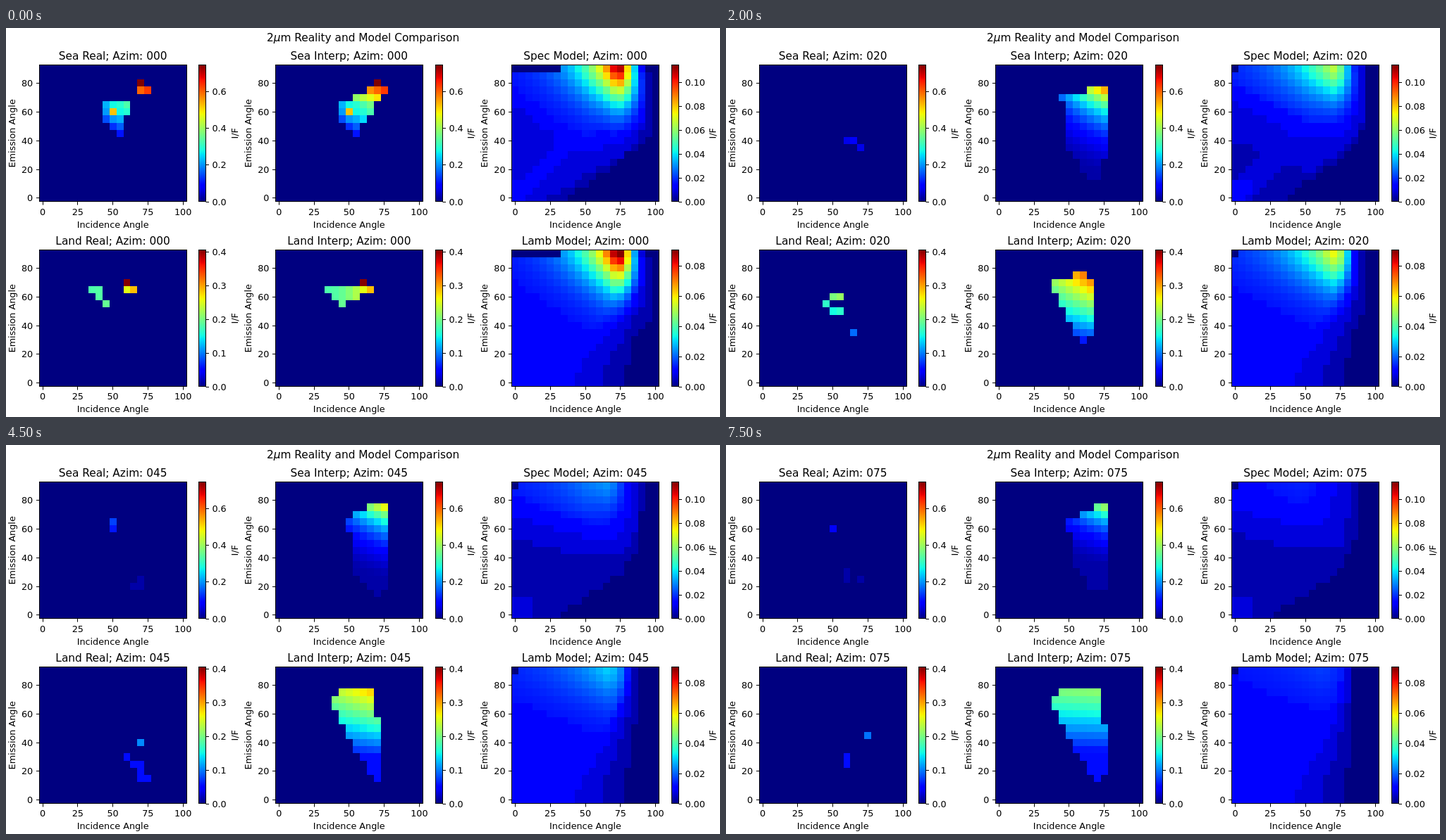
These frames come from a looping animation (1013x553 px, 8 s). An HTML page with a canvas:

```html
<!DOCTYPE html>
<html lang="en">
<head>
<meta charset="utf-8">
<title>Reality and Model Comparison</title>
<style>
  html, body { margin: 0; width: 100%; height: 100%; overflow: hidden; background: #fff; }
  canvas { display: block; }
</style>
</head>
<body>
<canvas id="stage" width="1013" height="553"></canvas>
<script>
const ctx = document.getElementById('stage').getContext('2d');
const STEP_MS = 500, STEPS = 16;
const COLS = 21, ROWS = 19, WIDTH = 209, HEIGHT = 194.4;
const CELL_W = WIDTH / COLS, CELL_H = HEIGHT / ROWS;
const FONT = '"DejaVu Sans", sans-serif', SMALL = 12.79, LARGE = 15.35;

const clamp = (v, lo = 0, hi = 1) => Math.min(hi, Math.max(lo, v));
const bell = x => Math.exp(-x * x);

// Piecewise linear curve through [x, y] points.
function ramp(v, points) {
  const i = points.findIndex(p => v <= p[0]);
  if (i < 0) return points[points.length - 1][1];
  if (i === 0) return points[0][1];
  const [x0, y0] = points[i - 1], [x1, y1] = points[i];
  return y0 + (y1 - y0) * (v - x0) / (x1 - x0);
}

function jet(v) {
  const r = ramp(v, [[.35, 0], [.66, 1], [.89, 1], [1, .5]]);
  const g = ramp(v, [[.125, 0], [.375, 1], [.64, 1], [.91, 0]]);
  const b = ramp(v, [[0, .5], [.11, 1], [.34, 1], [.65, 0]]);
  return `rgb(${[r, g, b].map(x => Math.round(x * 255))})`;
}

// Interpolated surfaces: a row range, left and right edges per row, and a value per cell.
function seaSurface(az) {
  if (az === 0) {
    const left = r => ramp(r, [[9, 11], [11, 9], [13, 9], [15, 13], [16, 14]]);
    const right = r => ramp(r, [[9, 10.7], [12, 12.6], [15, 15], [16, 14]]);
    const value = (c, r) => ramp(r, [[9, .1], [13, .3], [16, .745]])
      + .035 * (c - (left(r) + right(r)) / 2) + .3 * bell(Math.hypot(c - 10, r - 12) / .6);
    return { bottom: 9, top: 16, left, right, value };
  }
  return {
    bottom: Math.round(2 + az * .026),
    top: 15,
    left: r => ramp(r, [[2.5, 13.2 + az * .015], [7, 10 + az * .015], [11, 10 + az * .015],
      [12, 9.4 + az * .011], [13, 9.4 + az * .011], [14, 8.3 + az * .055], [15, 12.1 + az * .03]]),
    right: r => Math.min(15, 13 + (r - 3) * .35 + az * .03),
    value: (c, r) => {
      const edge = (.61 - az * .0027) * Math.exp(-(15 - r) * (.2 + az * .001)) - .02;
      return Math.max(.025, edge * (1 - .1 * (15 - c)));
    }
  };
}

function landSurface(az) {
  if (az === 0) return {
    bottom: 11,
    top: 14,
    left: r => ramp(r, [[11, 9], [13, 7], [14, 12]]),
    right: r => ramp(r, [[11, 9], [13, 13], [14, 12]]),
    value: (c, r) => .18 + .003 * (c - 7) ** 2 + .15 * Math.max(0, r - 13)
  };
  const bottom = Math.round(Math.max(3.4, 9.6 - az * .18));
  const left = r => ramp(r, [[3, 14], [7, 11], [11, 9], [13, 8], [14, 8.3], [15, Math.max(9, 12.8 - az * .1)]]);
  return {
    bottom,
    top: 15,
    left,
    right: r => {
      const side = 13.5 + .09 * (az * .36 - 5 - r);
      return Math.min(Math.max(r < 15 ? 13 : 12, side), left(r) + (r - bottom) * 1.5);
    },
    value: (c, r) => {
      const edge = (.38 - az * .0023) * (1 - .09 * (15 - r));
      return Math.max(.055, edge * (1 - (.075 - az * .0009) * (13 - c)));
    }
  };
}

function surfaceCells(s) {
  const cells = [];
  for (let r = s.bottom; r <= s.top; r++)
    for (let c = Math.round(s.left(r)); c <= Math.round(s.right(r)); c++) cells.push([c, r]);
  return cells;
}

// Observed cells lie on tracks through a few column, row points.
function track(...points) {
  const cells = [];
  for (let i = 0; i < points.length; i += 2) {
    const [c0, r0, c1 = c0, r1 = r0] = points.slice(i, i + 4);
    const n = Math.max(Math.abs(c1 - c0), Math.abs(r1 - r0), 1);
    for (let k = 0; k < n; k++)
      cells.push([Math.round(c0 + (c1 - c0) * k / n), Math.round(r0 + (r1 - r0) * k / n)]);
  }
  return cells;
}

function seaObserved(az) {
  if (az === 0) return [track(9, 13, 12, 13, 12, 12, 9, 12, 9, 11, 11, 11, 11, 9), track(10, 10),
    track(14, 16, 14, 15, 15, 15)].flat();
  if (az < 20) return [track(9, 13, 10, 13), track(12, 14, 13, 14, 13, 13, 14, 13),
    track(10, 11, 12, 11, 12, 8, 10, 8, 10, 9), track(10, 7, 11, 7), track(13, 3, 13, 2)].flat();
  if (az < 35) return track(12, 8, 13, 8, 14, 7);
  const high = az < 65 ? track(10, 13, 10, 12) : track(10, 12);
  const low = az < 55 ? track(14, 5, 14, 4, 13, 4) : track(14, 5);
  const stray = az < 45 ? track(12, 9, 13, 8) : az < 65 ? [] : track(12, 6, 12, 5);
  return [high, low, stray].flat();
}

function landObserved(az) {
  if (az === 0) return [track(7, 13, 8, 13, 8, 12, 9, 11), track(12, 14, 12, 13, 13, 13)].flat();
  if (az < 20) return [track(8, 13, 8, 12, 9, 12, 9, 11, 10, 11, 10, 10), track(10, 8),
    track(12, 14, 13, 14, 13, 13, 12, 13)].flat();
  if (az < 35) return [track(11, 12, 10, 12, 9, 11, 10, 10, 11, 10), track(13, 7)].flat();
  if (az < 45) return [track(8, 14), track(10, 12, 11, 12), track(12, 9, 14, 7), track(14, 4, 14, 3)].flat();
  if (az < 55) return [track(14, 8), track(12, 6, 13, 5, 14, 5, 14, 3, 15, 3)].flat();
  return az < 65 ? track(14, 5) : [track(15, 9), track(12, 6, 12, 5)].flat();
}

// Models return values normalised to their colour scale.
const emptyCorner = (c, r, az) => r === 18 && c < (az === 0 ? 7 : az <= 10 ? 2 : 1);
const banded = v => v < .14 ? Math.round(v / .04) * .04 : v;

function glint(inc, em, az, decay, spread) {
  const centre = 72 - az * .16, depth = 90 - em;
  const across = inc < centre
    ? Math.exp(-(centre - inc) / (21 + az * .35))
    : bell((inc - centre - 1) / (11 + az * .06 + depth * .2));
  return .9 * Math.exp(-((az / decay) ** 1.2)) * across * Math.exp(-((depth / spread) ** 1.4));
}

function specular(c, r, az) {
  if (emptyCorner(c, r, az)) return 0;
  const inc = c * 5, em = r * 5, near = Math.exp(-az / 25);
  const edge = 95 - az * .1 - 57.5 * Math.exp(-((em / 25) ** 1.5));
  let base = 0;
  if (inc < edge) {
    const height = em + (.2 + .55 * near) * Math.min(inc, 40);
    const floor = .04 + (em > .6 * (inc - 25) ? .04 * near : 0);
    const lift = clamp(.1 + (height - 77 + 9 * near) * .0021, floor, .12);
    const band = .03 * near * bell((inc - em) / 8) + (inc <= 10 && em <= 10 ? .04 : 0);
    base = Math.min(lift + band, .12, .04 + .002 * (edge - inc));
  }
  return banded(base + glint(inc, em, az, 30, 23));
}

function lambert(c, r, az) {
  if (emptyCorner(c, r, az)) return 0;
  const inc = c * 5, em = r * 5;
  const base = (.15 * Math.cos(inc * Math.PI / 180) - .0105) * (1 + (em / 45) ** 2);
  return banded(clamp(base, 0, .125) + glint(inc, em, az, 32, 23));
}

function text(str, x, y, { size = SMALL, align = 'center', turn = false } = {}) {
  ctx.save();
  ctx.translate(x, y);
  if (turn) ctx.rotate(-Math.PI / 2);
  ctx.font = `${size}px ${FONT}`;
  ctx.textAlign = align;
  ctx.fillStyle = '#000';
  ctx.fillText(str, 0, 0);
  ctx.restore();
}

function line(x0, y0, x1, y1) {
  ctx.beginPath();
  ctx.moveTo(x0, y0);
  ctx.lineTo(x1, y1);
  ctx.stroke();
}

function heading() {
  const parts = [['2', ''], ['μ', 'italic '], ['m Reality and Model Comparison', '']];
  const setFont = style => { ctx.font = `${style}${LARGE}px ${FONT}`; };
  const widths = parts.map(([s, style]) => { setFont(style); return ctx.measureText(s).width; });
  let x = 506.5 - widths.reduce((a, b) => a + b) / 2;
  ctx.fillStyle = '#000';
  ctx.textAlign = 'left';
  parts.forEach(([s, style], i) => { setFont(style); ctx.fillText(s, x, 18.5); x += widths[i]; });
}

function panel(column, row, title, max, tick, digits, cells, shade) {
  const x = 47.1 + column * 335.2, y = 52.7 + row * 262.9, bottom = y + HEIGHT, mid = y + HEIGHT / 2;
  const px = c => Math.round(x + c * CELL_W), py = r => Math.round(bottom - r * CELL_H);
  ctx.fillStyle = jet(0);
  ctx.fillRect(x, y, WIDTH, HEIGHT);
  for (const [c, r] of cells) {
    ctx.fillStyle = jet(shade(c, r));
    ctx.fillRect(px(c), py(r + 1), px(c + 1) - px(c), py(r) - py(r + 1));
  }

  const barX = Math.floor(x + 226.8) + .5, barW = 10;
  const gradient = ctx.createLinearGradient(0, bottom, 0, y);
  for (let i = 0; i <= 100; i++) gradient.addColorStop(i / 100, jet(i / 100));
  ctx.fillStyle = gradient;
  ctx.fillRect(barX, y, barW, HEIGHT);

  ctx.strokeStyle = '#000';
  ctx.lineWidth = 1;
  const left = Math.floor(x) + .5, top = Math.floor(y) + .5, h = Math.round(HEIGHT);
  ctx.strokeRect(left, top, WIDTH, h);
  ctx.strokeRect(barX, top, barW, h);

  for (let v = 0; v <= 100; v += 25) {
    const tx = x + (v + 2.5) / 5 * CELL_W, snapped = Math.floor(tx) + .5;
    line(snapped, bottom, snapped, bottom + 4.5);
    text(v, tx, bottom + 18.4);
  }
  for (let v = 0; v <= 80; v += 20) {
    const ty = Math.floor(bottom - (v + 2.5) / 5 * CELL_H) + .5;
    line(left, ty, left - 4.5, ty);
    text(v, x - 8.9, ty + 4.7, { align: 'right' });
  }
  for (let v = 0; v <= max; v += tick) {
    const ty = Math.floor(bottom - v / max * HEIGHT) + .5;
    line(barX + barW, ty, barX + barW + 4.5, ty);
    text(v.toFixed(digits), barX + barW + 8.9, ty + 4.7, { align: 'left' });
  }
  text(title, x + WIDTH / 2, y - 7.5, { size: LARGE });
  text('Incidence Angle', x + WIDTH / 2, bottom + 36.4);
  text('Emission Angle', x - 34.2, mid, { turn: true });
  text('I/F', x + 281.4 + (digits - 1) * 8.1, mid, { turn: true });
}

const wholeGrid = Array.from({ length: ROWS * COLS }, (_, i) => [i % COLS, Math.floor(i / COLS)]);
const places = [
  { name: 'Sea', surface: seaSurface, observed: seaObserved, max: .743, tick: .2,
    model: specular, modelName: 'Spec', modelMax: .1148 },
  { name: 'Land', surface: landSurface, observed: landObserved, max: .407, tick: .1,
    model: lambert, modelName: 'Lamb', modelMax: .0905 }
];

function draw(az) {
  const suffix = '; Azim: ' + String(az).padStart(3, '0');
  ctx.fillStyle = '#fff';
  ctx.fillRect(0, 0, 1013, 553);
  heading();
  places.forEach((p, row) => {
    const surface = p.surface(az), shade = (c, r) => surface.value(c, r) / p.max;
    panel(0, row, p.name + ' Real' + suffix, p.max, p.tick, 1, p.observed(az), shade);
    panel(1, row, p.name + ' Interp' + suffix, p.max, p.tick, 1, surfaceCells(surface), shade);
    panel(2, row, p.modelName + ' Model' + suffix, p.modelMax, .02, 2, wholeGrid,
      (c, r) => p.model(c, r, az));
  });
}

let shown = -1;
function tick() {
  const step = Math.floor(performance.now() / STEP_MS) % STEPS;
  if (step !== shown) {
    shown = step;
    draw(step * 5);
  }
  requestAnimationFrame(tick);
}
tick();
</script>
</body>
</html>
```
